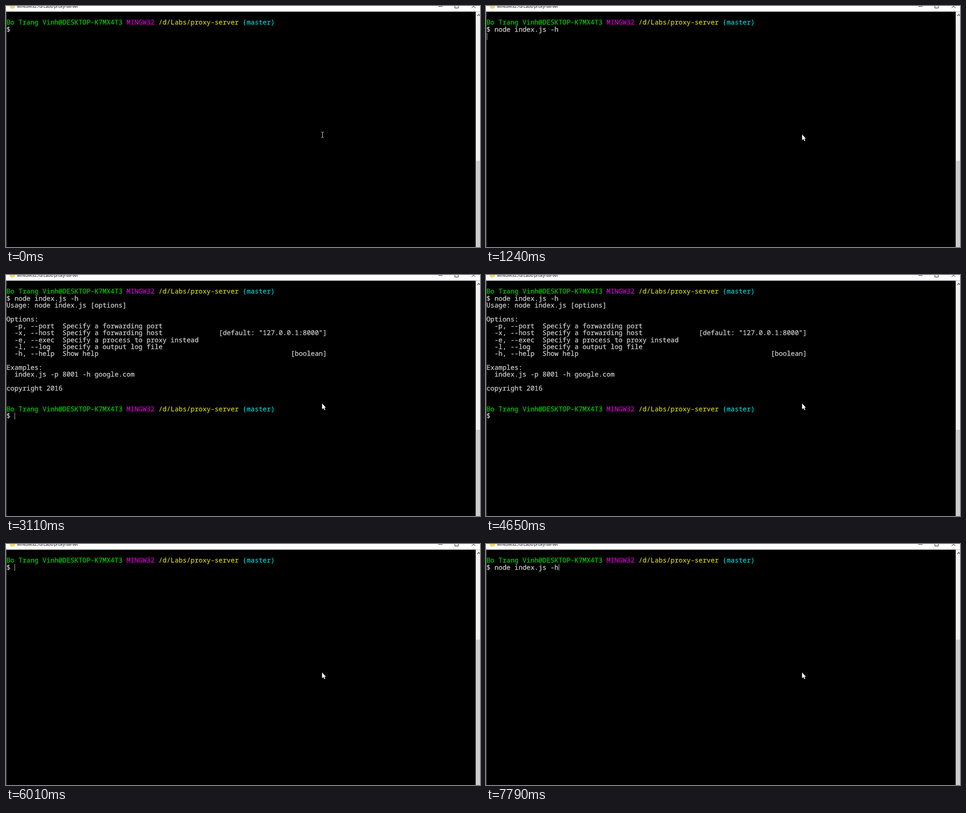
Animation of 1049 by 534 pixels, one loop 8 s. Source, as an HTML page:

```html
<!DOCTYPE html>
<html lang="en">
<head>
<meta charset="utf-8">
<title>Terminal session</title>
<style>
  html, body { margin: 0; width: 100%; height: 100%; overflow: hidden; background: #000; }
  svg { display: block; width: 1049px; height: 534px; }
  .term { color: #cccccc; }
  .term text {
    font: 14.77px "Noto Sans Mono", "DejaVu Sans Mono", monospace;
    fill: currentColor; stroke: currentColor; stroke-width: .3px;
    white-space: pre; text-rendering: geometricPrecision;
  }
  .term tspan { fill: currentColor; stroke: currentColor; }
  .title { font: 9.25px "Open Sans", "Noto Sans", sans-serif; text-rendering: geometricPrecision; }
  .end { text-anchor: end; }
  .user { color: #00cc00; }
  .sys { color: #cc00cc; }
  .path { color: #cccc00; }
  .branch { color: #00cccc; }

  .anim { animation: 8s step-end infinite; }
  #clear1 { animation-name: clear1; }
  #run1 { animation-name: run1; }
  #output { animation-name: output; }
  #prompt2 { animation-name: prompt2; }
  #run2 { animation-name: run2; }
  #clear2 { animation-name: clear2; }
  #caret { animation-name: caret; }
  #beam { animation-name: beam; }
  #arrow { animation-name: arrow; }
  #thumb { animation-name: thumb; }

  @keyframes clear1 {
    0%, 8.5%, 90.375%, 97.375%, 100% { opacity: 0; }
    5%, 87%, 92.25% { opacity: 1; }
  }
  @keyframes run1 {
    0%, 75.125%, 92.25% { opacity: 0; }
    8.5%, 90.375%, 97.375%, 100% { opacity: 1; }
  }
  @keyframes output {
    0%, 75.125%, 100% { opacity: 0; }
    24.625% { opacity: 1; }
  }
  @keyframes prompt2 {
    0%, 75.125%, 100% { opacity: 0; }
    26.25% { opacity: 1; }
  }
  @keyframes run2 {
    0%, 68.25%, 100% { opacity: 0; }
    62.875% { opacity: 1; }
  }
  @keyframes clear2 {
    0%, 75.125%, 100% { opacity: 0; }
    68.25% { opacity: 1; }
  }
  @keyframes beam {
    0% { opacity: 1; }
    5%, 100% { opacity: 0; }
  }
  @keyframes arrow {
    0% { opacity: 0; }
    15.5%, 100% { opacity: 1; }
  }
  @keyframes thumb {
    0% { transform: translateY(343px); }
    75.125%, 100% { transform: translateY(212px); }
  }
  /* text caret: moves with the input and blinks while idle */
  @keyframes caret {
    0% { opacity: 0; transform: translate(19px, 44px); }
    6.625% { opacity: 1; transform: translate(64px, 44px); }
    8.5% { opacity: 1; transform: translate(161px, 44px); }
    15.5% { opacity: .8; transform: translate(2px, 60px); }
    24.625% { opacity: .8; transform: translate(2px, 274px); }
    26.25%, 38.875%, 51.25% { opacity: 1; transform: translate(19px, 305px); }
    31.625%, 45.875%, 58.125% { opacity: 0; transform: translate(19px, 305px); }
    62.875% { opacity: 1; transform: translate(161px, 305px); }
    68.25% { opacity: 1; transform: translate(64px, 305px); }
    75.125% { opacity: 1; transform: translate(19px, 44px); }
    82% { opacity: 0; transform: translate(19px, 44px); }
    88.625%, 92.25% { opacity: 1; transform: translate(64px, 44px); }
    90.375%, 97.375%, 100% { opacity: 1; transform: translate(161px, 44px); }
  }
</style>
</head>
<body>
<svg viewBox="0 0 1049 534" xmlns="http://www.w3.org/2000/svg">
  <rect width="1049" height="534" fill="#000"/>
  <rect y="13" width="1" height="521" fill="#6b6b6b"/>

  <!-- title bar -->
  <rect width="1049" height="12.5" fill="#fff"/>
  <circle cx="14" cy="0" r="6" fill="#ecd566"/>
  <text class="title" x="24" y="4.4">MINGW32:/d/Labs/proxy-server</text>
  <g fill="none" stroke="#111">
    <path d="M957 .5h9"/>
    <path d="M993.5 -4v8.5h7.5v-8.5"/>
    <path d="M1030.5 4.5l8.5 -8.5M1039 4.5l-8.5 -8.5"/>
  </g>

  <!-- scrollbar -->
  <rect x="1039.5" y="12.5" width="9.5" height="521.5" fill="#f0f0f0"/>
  <rect id="thumb" class="anim" x="1040" width="9" height="330" fill="#cdcdcd"/>
  <path d="M1043 22l3.2 -3.4 3.2 3.4" fill="none" stroke="#505050" stroke-width="1.4"/>

  <g class="term">
    <text id="prompt" x="1" y="41.2"><tspan class="user">Bo Trang Vinh@DESKTOP-K7MX4T3</tspan> <tspan class="sys">MINGW32</tspan> <tspan class="path">/d/Labs/proxy-server</tspan> <tspan class="branch">(master)</tspan></text>
    <text x="1" y="56.5">$</text>
    <text id="run1" class="anim" x="1" y="56.5">  node index.js -h</text>
    <text id="clear1" class="anim" x="1" y="56.5">  clear</text>

    <g id="output" class="anim">
      <text x="1" y="71.9">Usage: node index.js [options]</text>
      <text x="1" y="102.5">Options:</text>
      <text x="1" y="117.9">  -p, --port  Specify a forwarding port</text>
      <text x="1" y="133.2">  -x, --host  Specify a forwarding host</text>
      <text class="end" x="710" y="133.2">[default: "127.0.0.1:8000"]</text>
      <text x="1" y="148.5">  -e, --exec  Specify a process to proxy instead</text>
      <text x="1" y="163.9">  -l, --log   Specify a output log file</text>
      <text x="1" y="179.2">  -h, --help  Show help</text>
      <text class="end" x="710" y="179.2">[boolean]</text>
      <text x="1" y="209.8">Examples:</text>
      <text x="1" y="225.2">  index.js -p 8001 -h google.com</text>
      <text x="1" y="255.8">copyright 2016</text>
    </g>

    <g id="prompt2" class="anim">
      <use href="#prompt" y="260.6"/>
      <text x="1" y="317.2">$</text>
    </g>
    <text id="run2" class="anim" x="1" y="317.2">  node index.js -h</text>
    <text id="clear2" class="anim" x="1" y="317.2">  clear</text>
  </g>

  <rect id="caret" class="anim" width="1" height="15" fill="#bfbfbf"/>

  <!-- mouse pointers -->
  <path id="beam" class="anim" d="M697.5 279.5h2.2l.8 .8 .8 -.8h2.2M700.5 280v10.5M697.5 291h2.2l.8 -.8 .8 .8h2.2" fill="none" stroke="#e6e6e6"/>
  <path id="arrow" class="anim" d="M699.5 284.5v13l3 -2.8 2.1 4.6 2 -.9 -2 -4.5h3.3z" fill="#fff"/>
</svg>
</body>
</html>
```
